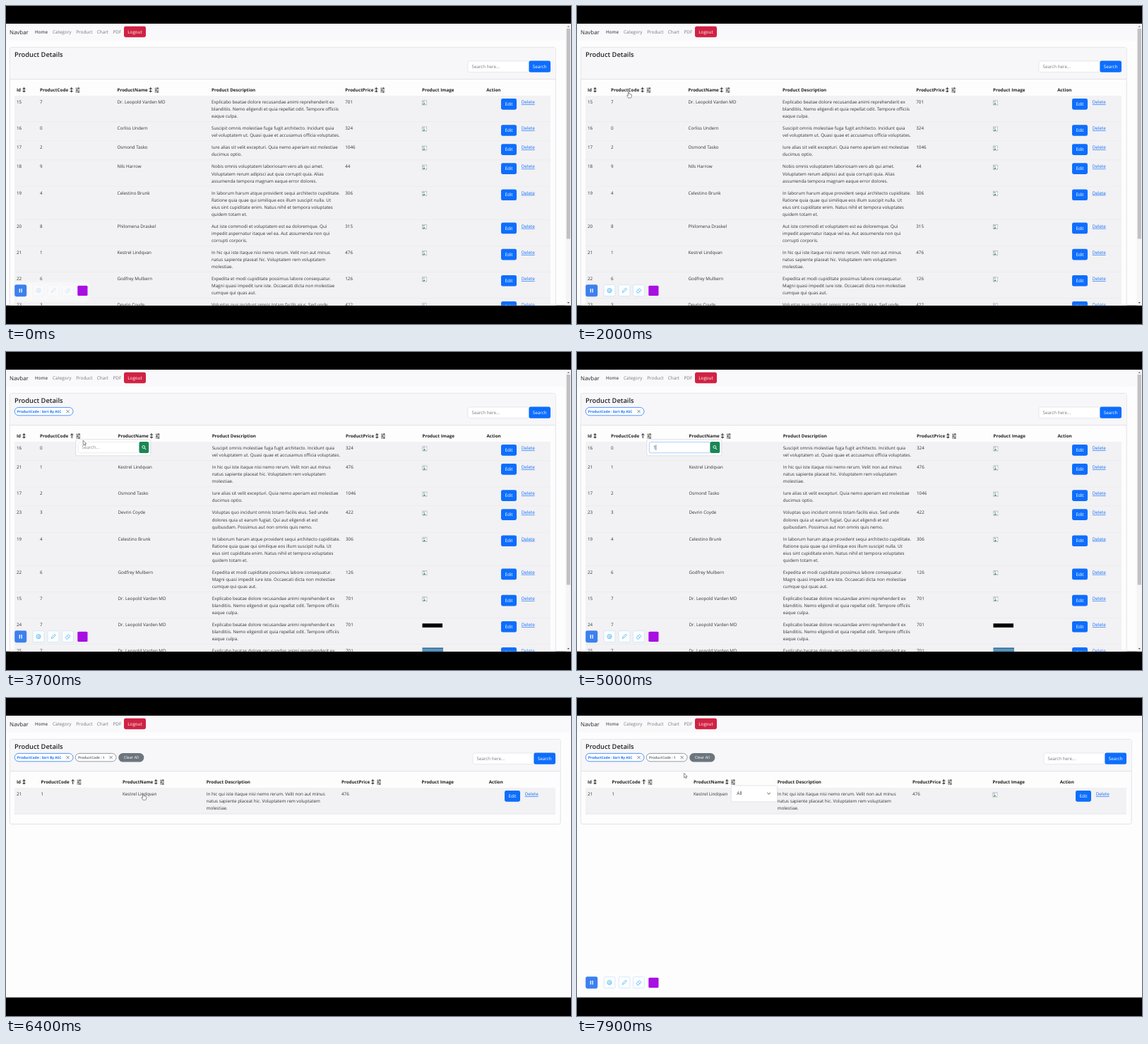
These frames come from a looping animation (800x450 px, 8000 ms). An HTML page:

```html
<!DOCTYPE html>
<html lang="en">
<head>
<meta charset="utf-8">
<title>Product Details</title>
<style>
html, body { margin: 0; width: 100%; height: 100%; overflow: hidden; background: #000; }
svg { display: block; width: 800px; height: 450px; }
text { font-family: "Open Sans", "Noto Sans", sans-serif; text-rendering: geometricPrecision; white-space: pre; }
</style>
</head>
<body>
<svg viewBox="0 0 800 450">
  <defs>
    <clipPath id="view"><rect y="25" width="800" height="398.7"/></clipPath>
    <filter id="soft" x="-20%" y="-50%" width="140%" height="200%"><feGaussianBlur stdDeviation="2.5"/></filter>
  </defs>
  <rect width="800" height="450"/>
  <g clip-path="url(#view)">
    <g id="page"></g>
    <g id="popup"></g>
    <rect id="glow" x="13" y="391" width="104" height="27" fill="#fff" filter="url(#soft)"/>
    <g id="bar"></g>
    <g id="cursor" fill="#fff" stroke="#444" stroke-width=".6" stroke-linejoin="round">
      <path id="arrow" d="M0 0V6.6L1.6 5.2 2.6 7.5 3.6 7 2.6 4.9H4.6Z"/>
      <path id="hand" d="M-.7 .5Q0-.4.7.5V3.2Q1.5 2.6 2 3.4 2.9 2.9 3.3 3.8 4.4 3.5 4.4 4.6V6.2Q4.2 8 3.2 8.8H-.3Q-1.2 7.5-2.4 5.6-2.2 4.7-1.2 5.2L-.7 5.7Z"/>
      <path id="beam" fill="none" d="M-1.2-3.5H1.2M0-3.5V3.5M-1.2 3.5H1.2"/>
    </g>
  </g>
</svg>
<script>
const $ = id => document.getElementById(id);
const BLUE = '#0d6efd', GRAY = '#6c757d', LOOP = 8000;

const text = (x, y, s, o = {}) =>
  `<text x="${x}" y="${y}" font-size="${o.size || 6.25}" font-weight="${o.weight || 400}" fill="${o.fill || '#333337'}"` +
  ` text-anchor="${o.mid ? 'middle' : 'start'}"${o.line ? ' text-decoration="underline"' : ''}>${s}</text>`;
const box = (x, y, w, h, fill, stroke = 'none', r = 0) =>
  `<rect x="${x}" y="${y}" width="${w}" height="${h}" rx="${r}" fill="${fill}" stroke="${stroke}" stroke-width=".7"/>`;
const path = (d, stroke, w = .8, fill = 'none') =>
  `<path d="${d}" fill="${fill}" stroke="${stroke}" stroke-width="${w}"/>`;
const button = (x, y, w, h, fill, s) =>
  box(x, y, w, h, fill, 'none', 2.4) + text(x + w / 2, y + h / 2 + 2.2, s, { fill: '#fff', mid: 1 });

const doctor = 'Dr. Leopold Varden MD';
const doctorText = 'Explicabo beatae dolore recusandae animi reprehenderit ex|blanditiis. Nemo eligendi et quia repellat odit. Tempore officiis|eaque culpa.';
// id: code, name, price, description, image
const items = {
  15: [7, doctor, 701, doctorText],
  16: [0, 'Corliss Undern', 324, 'Suscipit omnis molestiae fuga fugit architecto. Incidunt quia|vel voluptatem ut. Quasi quae et accusamus officia voluptates.'],
  17: [2, 'Osmond Tasko', 1046, 'Iure alias sit velit excepturi. Quia nemo aperiam est molestiae|ducimus optio.'],
  18: [9, 'Nils Harrow', 44, 'Nobis omnis voluptatem laboriosam vero ab qui amet.|Voluptatem rerum adipisci aut quia corrupti quia. Alias|assumenda tempora magnam eaque error dolores.'],
  19: [4, 'Celestino Brunk', 306, 'In laborum harum atque provident sequi architecto cupiditate.|Ratione quia quae qui similique eos illum suscipit nulla. Ut|eius sint cupiditate enim. Natus nihil et tempora voluptates|quidem totam et.'],
  20: [8, 'Philomena Draskel', 315, 'Aut iste commodi et voluptatem est ea doloremque. Qui|impedit aspernatur itaque vel ea. Aut assumenda non qui|corrupti corporis.'],
  21: [1, 'Kestrel Lindqvan', 476, 'In hic qui iste itaque nisi nemo rerum. Velit non aut minus|natus sapiente placeat hic. Voluptatem rem voluptatem|molestiae.'],
  22: [6, 'Godfrey Mulbern', 126, 'Expedita et modi cupiditate possimus labore consequatur.|Magni quasi impedit iure iste. Occaecati dicta non molestiae|cumque qui quas aut.'],
  23: [3, 'Devrin Coyde', 422, 'Voluptas quo incidunt omnis totam facilis eius. Sed unde|dolores quia ut earum fugiat. Qui aut eligendi et est|quibusdam. Possimus aut non omnis quis nemo.'],
  24: [7, doctor, 701, doctorText, 'black'],
  25: [7, doctor, 701, doctorText, 'photo']
};

// cols: id, code, name, description, price, image, action
const views = {
  all: { ids: [15, 16, 17, 18, 19, 20, 21, 22, 23], cols: [15, 48, 157.5, 291, 480.3, 589, 680.3],
         sorts: [25.5, 92.7, 204.7, 524.3], filters: [101.5, 213.5, 533.2], right: 771, edit: 701 },
  sorted: { ids: [16, 21, 17, 23, 19, 22, 15, 24, 25], cols: [15, 48, 158.5, 291.7, 481, 589.5, 680.5],
            sorts: [25.5, 93.3, 206, 525.3], filters: [102.3, 214.7, 534], right: 771, edit: 701, asc: 1 },
  found: { ids: [21], cols: [15, 49.5, 165, 283.7, 475, 588.5, 683.7],
           sorts: [25.5, 94.7, 212.3, 519.3], filters: [103.5, 221, 528], right: 778, edit: 706, asc: 1, found: 1 }
};

const sortIcon = (x, asc) =>
  path(`M${x} 115.7V122M${x - 2} 117.7l2-2 2 2` + (asc ? '' : `M${x - 2} 120l2 2 2-2`), '#222', 1);
const filterIcon = x =>
  path(`M${x - 3} 116.4h6M${x - 3} 119h6M${x - 3} 121.6h6`, '#222', .8) +
  path(`M${x + 1.2} 115.5v1.8M${x - 1.2} 118.1v1.8M${x + 1.2} 120.7v1.8`, '#222', 1.2);

function picture(x, y, kind) {
  if (kind === 'black') return box(x, y + .5, 28.5, 5.6, '#000');
  if (kind === 'photo') return box(x, y - 2.5, 29.5, 9, '#3b79a8') + box(x, y, 29.5, 1.2, '#79b3c9');
  return box(x + .4, y, 6, 6.2, '#fff', '#a8abb0') +
    path(`M${x + .8} ${y + 5.8}l2-2.6 3 2.6z`, 'none', 0, '#4b9c4f') +
    box(x + 1.1, y + .8, 2.8, 1.8, '#9cbbe8') +
    path(`M${x + 3.6} ${y + 6.4}l3-3.2`, '#fff', .9);
}

function chip(x, w, color, label) {
  const cx = x + w - 7.5;
  return box(x, 78.4, w, 11.4, '#fff', color, 5.7) +
    text(x + 3.6, 86, label, { size: 4.85, weight: 700, fill: color }) +
    path(`M${cx - 2.2} 81.9l4.4 4.4m0-4.4l-4.4 4.4`, '#555', .7);
}

function row(v, id, y, images) {
  const [code, name, price, desc, img] = items[id], lines = desc.split('|');
  const h = lines.length * 10.08 + 6.9, base = y + 11.2, c = v.cols;
  const out = box(12, y, v.right - 12, h, '#f2f1f3') +
    path(`M12 ${y + h}H${v.right}`, '#dcdde0', .6) +
    [id, code, name].map((s, i) => text(c[i], base, s)).join('') +
    lines.map((s, i) => text(c[3], base + i * 10.08, s)).join('') +
    text(c[4], base, price) +
    (images ? picture(c[5], y + 6.8, img) : '') +
    button(v.edit, y + 4, 22, 15.7, BLUE, 'Edit') +
    text(v.edit + 28.8, base, 'Delete', { fill: BLUE, line: 1 });
  return [out, h];
}

function page(v, images) {
  const r = v.right;
  let s = box(0, 25, 800, 400, '#fefdfe') + box(0, 25, 800, 24, '#f9f8fb') +
    text(5, 40, 'Navbar', { size: 7.9, fill: '#222' }) +
    [[41, 'Home'], [66, 'Category'], [99.3, 'Product'], [128.8, 'Chart'], [151.5, 'PDF']]
      .map(([x, n], i) => text(x, 39.2, n, { size: 6.35, fill: i ? '#76767a' : '#222' })).join('') +
    button(167, 28.8, 31, 15.4, '#d02243', 'Logout') +
    box(5.4, 58.4, r + 1.8, v.found ? 120 : 400, '#fefdfe', '#d6d6da', 2.5) +
    box(5.8, 58.8, r + 1, 44.6, '#f7f6f9') + path(`M5.4 103.6H${r + 7}`, '#d6d6da', .7) +
    text(12, 72.3, 'Product Details', { size: 9.3, weight: 600, fill: '#222' }) +
    box(r - 117, 78, 87, 15.6, '#fff', '#dfe1e5', 2.4) +
    text(r - 111.5, 88.1, 'Search here...', { fill: '#77787c' }) +
    button(r - 30.6, 77.6, 30.6, 16.2, BLUE, 'Search');
  if (v.asc) s += chip(12.2, 82.8, BLUE, 'ProductCode : Sort By ASC');
  if (v.found) s += chip(98.3, 57.8, GRAY, 'ProductCode : 1') + box(159.3, 78, 36, 12.6, GRAY, 'none', 6.3) +
    text(177.3, 86.4, 'Clear All', { size: 5.6, fill: '#fff', mid: 1 });
  s += ['Id', 'ProductCode', 'ProductName', 'Product Description', 'ProductPrice', 'Product Image', 'Action']
      .map((n, i) => text(v.cols[i], 121.2, n, { size: 6.28, weight: 700, fill: '#222' })).join('') +
    v.sorts.map((x, i) => sortIcon(x, v.asc && i === 1)).join('') + v.filters.map(filterIcon).join('');
  let y = 127;
  for (const id of v.ids) {
    const [out, h] = row(v, id, y, images);
    s += out;
    y += h;
  }
  if (!v.found) s += box(792.5, 25, 7.5, 400, '#f5f5f6') + box(793.7, 32, 5.2, 297.5, '#c1c1c4') +
    path('M794.7 30l1.6-2 1.6 2z', 'none', 0, '#777') + path('M794.7 419l1.6 2 1.6-2z', 'none', 0, '#555');
  return s;
}

function searchBox(focus, typed, caret) {
  return box(98.8, 123.8, 106, 23, '#fff', '#d3d3d6', 2.4) +
    box(102.3, 127.4, 86.4, 15.4, '#fff', focus ? '#86b7fe' : '#e2e4e8', 2) +
    (typed ? text(108, 137.3, '1') : text(107.5, 137.3, 'Search...', { fill: '#85868a' })) +
    (caret ? path(`M${typed ? 111.8 : 107.2} 131.5v7.5`, '#222', .6) : '') +
    box(188.5, 127, 13.7, 16, '#198754', 'none', 2) +
    '<circle cx="194.8" cy="134.4" r="1.9" fill="none" stroke="#fff" stroke-width=".9"/>' +
    path('M196.2 135.9l2 2.1', '#fff', 1);
}
const selectBox = () =>
  box(218.2, 123.8, 65.5, 23, '#fff', '#d9d9dc', 2.4) +
  text(226.3, 137.3, 'All', { size: 6.5 }) + path('M269.4 134l2.1 2.1 2.1-2.1', '#444', 1);

const tools = [38, 59, 79.5].map(x => box(x, 394.6, 16, 16, '#fbfdff', '#c6e3f8', 2)).join('') +
  '<circle cx="46" cy="402.6" r="3" fill="none" stroke="#4db2ef" stroke-width=".9"/>' +
  '<circle cx="46.3" cy="402.8" r="1.3" fill="none" stroke="#4db2ef" stroke-width=".8"/>' +
  path('M64.3 405.3l.5-1.9 4.2-4.2 1.4 1.4-4.2 4.2z', '#4db2ef', .8) +
  path('M84.3 403.6l4-4 2.6 2.6-4 4h-1.3zM86.3 401.6l2.6 2.6', '#4db2ef', .8);
$('bar').innerHTML = `<g id="tools">${tools}</g>` + box(12.2, 394.2, 17, 17, '#3c80ee', 'none', 2.4) +
  path('M19.3 400v5.6M22.1 400v5.6', '#fff', 1.3) + box(101.3, 395.8, 14.2, 14.2, '#a70fe2', 'none', 1.5);

const route = [[100, 22, 396], [800, 62, 170], [1400, 70, 135], [1800, 73, 121.3], [2200, 73, 121.3],
  [2800, 103.5, 120.5], [3550, 103.5, 120.5], [3700, 109.2, 125], [4200, 140, 135], [5200, 142, 135],
  [5600, 150, 136], [6200, 194.3, 135.5], [6400, 194.3, 135.5], [6950, 221, 118], [7450, 221, 118], [7900, 151.6, 106.3]];

const clamp = x => Math.max(0, Math.min(1, x));
function pointer(t) {
  let i = route.findIndex(p => p[0] > t);
  if (i < 0) return route[route.length - 1].slice(1);
  if (!i) return route[0].slice(1);
  const [t0, x0, y0] = route[i - 1], [t1, x1, y1] = route[i];
  let k = (t - t0) / (t1 - t0);
  k = k * k * (3 - 2 * k);
  return [x0 + (x1 - x0) * k, y0 + (y1 - y0) * k];
}
const within = (t, ...spans) => spans.some(([a, b]) => t >= a && t < b);
const show = (id, on) => $(id).setAttribute('visibility', on ? 'visible' : 'hidden');

const last = {};
function fill(id, key, make) {
  if (last[id] === key) return;
  last[id] = key;
  $(id).innerHTML = make();
}

function draw(t) {
  const name = t < 2300 ? 'all' : t < 6400 ? 'sorted' : 'found';
  const images = !within(t, [6400, 6500]);
  fill('page', name + images, () => page(views[name], images));

  const focus = t >= 4200, typed = t >= 4800, caret = focus && Math.floor(t / 500) % 2 === 0;
  const pop = within(t, [3000, 6400]) ? 'search' : t >= 7200 ? 'select' : '';
  fill('popup', pop + focus + typed + caret, () =>
    pop === 'search' ? searchBox(focus, typed, caret) : pop ? selectBox() : '');

  $('tools').setAttribute('opacity', .3 + .7 * clamp(t / 600));
  $('glow').setAttribute('opacity', .6 * (1 - clamp(t / 600)));
  $('bar').setAttribute('opacity', t < 6400 ? 1 : clamp((t - 6700) / 400));

  const [x, y] = pointer(t);
  $('cursor').setAttribute('transform', `translate(${x} ${y})`);
  const visible = t >= 100 && !within(t, [4700, 5200]);
  const hand = within(t, [1700, 3600], [5950, 7550]), beam = within(t, [3950, 5950]);
  show('hand', visible && hand);
  show('beam', visible && beam);
  show('arrow', visible && !hand && !beam);
}

const start = performance.now();
function tick() {
  draw((performance.now() - start) % LOOP);
  requestAnimationFrame(tick);
}
tick();
</script>
</body>
</html>
```
